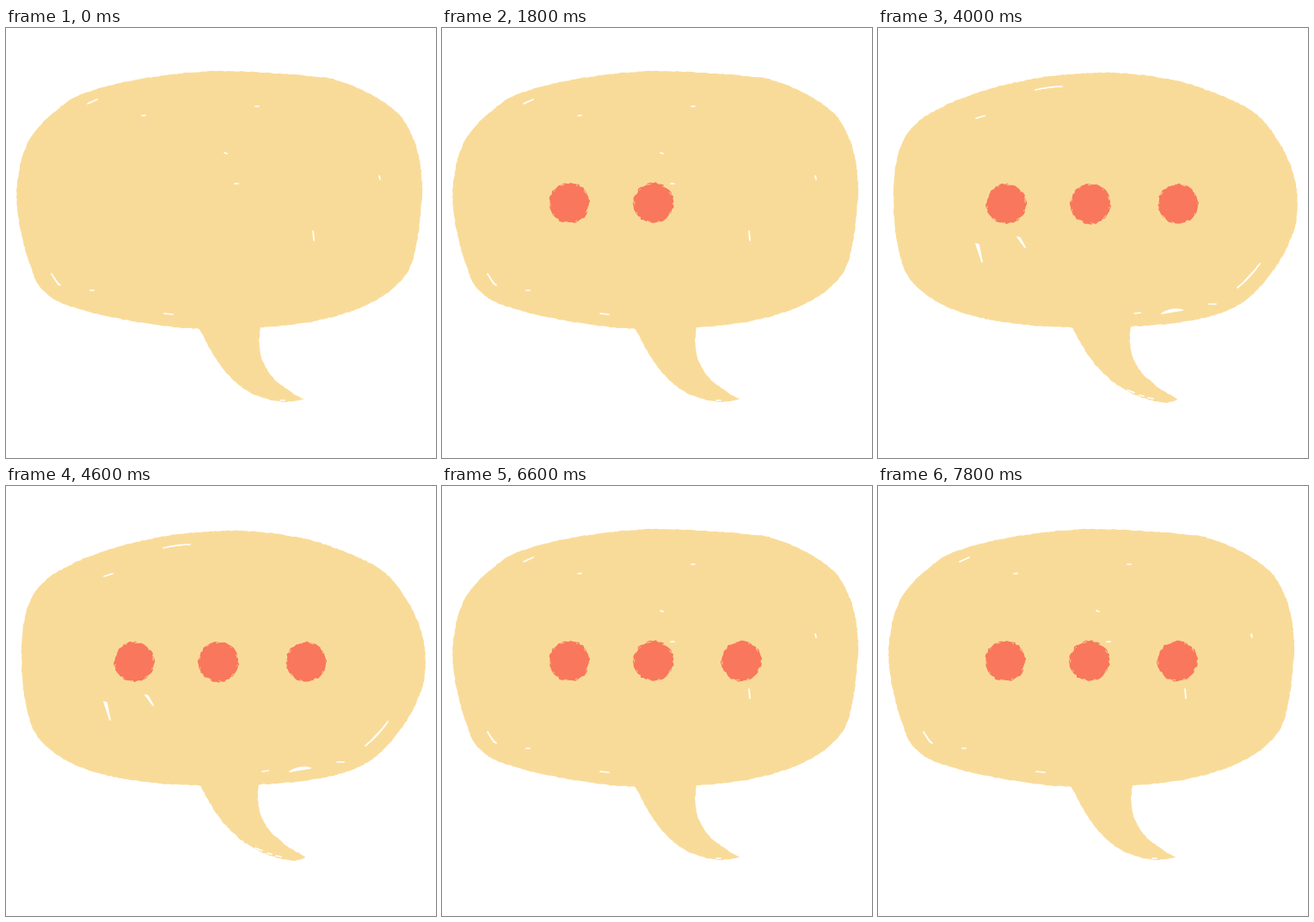
An HTML page for the animation above (8000 ms loop, 500x500 px).

```html
<!DOCTYPE html>
<html lang="en">
<head>
<meta charset="utf-8">
<title>Typing bubble</title>
<style>
  html, body { margin: 0; width: 100%; height: 100%; overflow: hidden; background: #fff; }
  svg { display: block; width: 100%; height: 100%; }
  .bubble { fill: #f9db99; }
  .specks { fill: #fff; stroke: #fff; stroke-width: 1.7; stroke-linecap: round; stroke-linejoin: round; }
  .dot { fill: #f9775c; }
  .nicks { fill: none; stroke: #f9db99; stroke-dasharray: 4 14 2 9; }
</style>
</head>
<body>
<svg id="stage" viewBox="0 0 500 500"></svg>
<script>
const STEP = 200, STEPS = 40;

const left = {
  outline: `M240,50 C290,50 340,54 375,58 C405,66 440,82 460,104 C476,125 484,155 484,190
    C482,220 480,240 475,262 C465,320 375,345 295.5,348 C291,385 300,408 347,432 L326,435
    C275,432 250,402 225,350 C170,347 105,335 65,320 C45,311 36,300 31,284
    C20,255 13,225 12,190 C18,140 22,122 75,83 C105,66 180,53 240,50Z`,
  specks: `M95,88l11,-5 M158,102l4,-.5 M290,91h4 M254,145l3,1 M266,181h4 M434,172l1,4
    M357,236l1,11 M53,286l7,11l3,2 M98,305h4 M184,332l10,1 M319,433h5`,
  shift: 0
};

const right = {
  outline: `M262,52 C310,52 355,61 385,73 C400,79 432,89 450,110 C472,137 488,168 488,205
    C488,245 462,288 427,317 C400,338 345,345 293.5,347 C290,385 300,405 349,432 L336,436
    C282,430 250,398 226,348 C160,347 100,338 65,316 C45,303 32,290 28,273
    C20,245 18,225 18,200 C18,160 22,128 50,106 C95,75 180,52 262,52Z`,
  specks: `M183,72q16,-4 31,-4 M114,105l10,-3 M114,251l3,1l4,20z M162,243l3,1l6,11z M360,213h1
    M418,302q15,-12 26,-28 M298,332l7,-1 M330,332q12,-7 24,-4z M385,321h8
    M290,421l8,3 M304,427l5,1 M314,430l6,1`,
  shift: 1
};

// Halfway value for every number in two matching paths
function blend(a, b) {
  const other = b.match(/[\d.]+/g);
  let i = 0;
  return a.replace(/[\d.]+/g, n => (+n + +other[i++]) / 2);
}

const middle = { outline: blend(left.outline, right.outline), specks: '', shift: 0.5 };

function seeded(seed) {
  return () => (seed = seed * 16807 % 2147483647) / 2147483647;
}

function add(parent, tag, attributes = {}) {
  const node = document.createElementNS('http://www.w3.org/2000/svg', tag);
  for (const name in attributes) node.setAttribute(name, attributes[name]);
  return parent.appendChild(node);
}

// Gives a path or circle a dry-brush edge
function addRough(parent, tag, attributes, random, jitter) {
  const smooth = add(parent, tag, attributes);
  const length = smooth.getTotalLength();
  const wobble = () => (random() - 0.5) * jitter;
  const points = [];
  for (let along = 0; along < length; along += 3) {
    const { x, y } = smooth.getPointAtLength(along);
    points.push(`${x + wobble()},${y + wobble()}`);
  }
  smooth.remove();
  add(parent, 'polygon', { class: attributes.class, points: points.join(' ') });
}

function addDot(parent, cx, cy, random) {
  const group = add(parent, 'g');
  addRough(group, 'circle', { class: 'dot', cx, cy, r: 23.3 }, random, 2.2);
  add(group, 'circle', { class: 'nicks', cx, cy, r: 22.3, 'stroke-dashoffset': random() * 29 });
  return group;
}

const stage = document.getElementById('stage');
const poses = [left, middle, right].map(({ outline, specks, shift }, index) => {
  const group = add(stage, 'g');
  const random = seeded(71 + index * 40);
  addRough(group, 'path', { class: 'bubble', d: outline }, random, 1);
  add(group, 'path', { class: 'specks', d: specks });
  const dots = [148, 246, 348].map(x => addDot(group, x + shift, 203.5 + shift, random));
  return { group, dots };
});

const show = (node, on) => node.setAttribute('display', on ? 'inline' : 'none');

// Three poses alternate; one more dot appears with each new round
function draw(time) {
  const step = Math.floor(time / STEP) % STEPS;
  const round = Math.floor(step / poses.length);
  poses.forEach(({ group, dots }, i) => {
    show(group, i === step % poses.length);
    dots.forEach((dot, k) => show(dot, round >= k + 2));
  });
}

let start;
function tick(now) {
  start ??= now;
  draw(now - start);
  requestAnimationFrame(tick);
}
draw(0);
requestAnimationFrame(tick);
</script>
</body>
</html>
```
